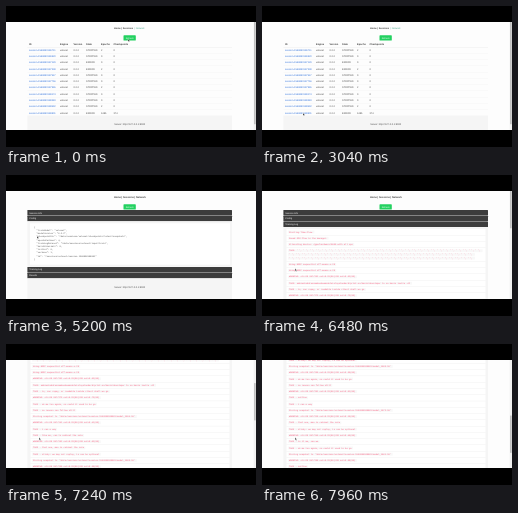
These frames come from a looping animation (250x141 px, 8 s). An HTML page with a canvas:

```html
<!DOCTYPE html>
<html lang="en">
<head>
<meta charset="utf-8">
<style>
  html, body { margin: 0; width: 100%; height: 100%; overflow: hidden; background: #000; }
  canvas { display: block; width: 100vw; height: 100vh; }
</style>
</head>
<body>
<canvas id="stage"></canvas>
<script>
const W = 250, H = 141, LOOP = 8000;
const TOP = 16, BOTTOM = 124, VIEW = BOTTOM - TOP;
const LEFT = 21.4, RIGHT = 226, ROW = 6.27;
const SANS = '"Liberation Sans", Arial, sans-serif';
const MONO = '"Liberation Mono", monospace';
const INK = '#4a4a4a', DARK = '#3c3c3c', LINK = '#3273dc', RED = '#f9587c';

const canvas = document.getElementById('stage');
const ctx = canvas.getContext('2d');

function fit() {
  const d = window.devicePixelRatio || 1;
  canvas.width = Math.round(innerWidth * d);
  canvas.height = Math.round(innerHeight * d);
}
addEventListener('resize', fit);
fit();

function box(x, y, w, h, color) {
  ctx.fillStyle = color;
  ctx.fillRect(x, y, w, h);
}

function rounded(x, y, w, h, r, color) {
  ctx.fillStyle = color;
  ctx.beginPath();
  ctx.roundRect(x, y, w, h, r);
  ctx.fill();
}

function text(str, x, y, color = INK, { size = 2.45, bold = false, font = SANS, align = 'left' } = {}) {
  ctx.font = `${bold ? 'bold ' : ''}${size}px ${font}`;
  ctx.textAlign = align;
  ctx.textBaseline = 'middle';
  ctx.textRendering = 'geometricPrecision';
  ctx.fillStyle = color;
  ctx.fillText(str, x, y);
}

const code = (str, x, y, color) => text(str, x, y, color, { size: 2.14, font: MONO });

// Eased value along [time, ...values] keys.
function track(keys, t) {
  let a = keys[0];
  for (const b of keys) {
    if (t < b[0]) {
      const p = (t - a[0]) / (b[0] - a[0]);
      const e = p * p * (3 - 2 * p);
      return a.slice(1).map((v, i) => v + (b[i + 1] - v) * e);
    }
    a = b;
  }
  return a.slice(1);
}

const pointerKeys = [
  [0, 122, 33], [480, 122, 33], [660, 128, 48], [1080, 128, 48], [1860, 41, 107],
  [3200, 41, 107], [3780, 52, 62], [3880, 52, 62], [4060, 51, 57], [4340, 38, 60],
  [4680, 38, 60], [5180, 31, 61], [5520, 31, 61], [6220, 33, 93.5]
];
const scrollKeys = [
  [0, 0], [6880, 0], [6990, 3], [7220, 67], [7420, 67], [7660, 130], [7850, 130], [7940, 161]
];

function header(list) {
  if (list) {
    text('Home | Sessions', 108, 22.4, DARK, { bold: true, size: 2.4 });
    text('| Network', 128.4, 22.4, '#48a68c', { size: 2.4 });
  } else {
    text('Home | Sessions | Network', 123.9, 22.4, DARK, { bold: true, size: 2.5, align: 'center' });
  }
  rounded(117.5, 29.3, 12.3, 5.3, .6, '#23d160');
  text('Refresh', 123.65, 32, '#fff', { size: 2.3, align: 'center' });
}

function footer(y) {
  box(LEFT, y, RIGHT - LEFT, 20.5, '#f5f5f5');
  text('Server: http://127.0.0.1:8000', 123.7, y + 8.7, INK, { align: 'center' });
  return y + 20.5 - TOP;
}

const columns = [23, 54, 67.5, 80, 95, 107.5];
const titles = ['ID', 'Engine', 'Version', 'State', 'Epochs', 'Checkpoints'];
const sessionId = i => 'session-15668901' + (86711 + i * 209);

function listPage() {
  header(true);
  titles.forEach((s, c) => text(s, columns[c], 38, DARK, { bold: true }));
  box(LEFT, 41, RIGHT - LEFT, .25, '#dbdbdb');
  for (let i = 0; i < 11; i++) {
    const y = 44.2 + i * ROW, last = i === 10;
    const failed = i === 2 || i === 3 || last;
    const cells = [sessionId(i), 'velonet', '0.2.2', failed ? 'ERROR' : 'STOPPED',
      last ? '1485' : i % 3 ? '0' : '2', last ? '374' : '0'];
    cells.forEach((s, c) => text(s, columns[c], y, c ? INK : LINK));
    box(LEFT, y + 3, RIGHT - LEFT, .15, '#e4e4e4');
  }
  return footer(109.6);
}

const BAR = 5.45, GAP = .3;
function bar(label, y) {
  rounded(LEFT, y, RIGHT - LEFT, BAR, .5, DARK);
  text(label, 23.2, y + 2.8, '#fff', { size: 2.35 });
}

function infoBody(y) {
  box(LEFT, y, RIGHT - LEFT, 17.3, '#f5f5f5');
  box(24, y + 1.8, 42, 13, '#fff');
  box(24, y + 8.3, 42, .15, '#dbdbdb');
  text('ID', 26, y + 5.2, DARK, { bold: true });
  text(sessionId(10), 36, y + 5.2);
  text('State', 26, y + 11.6, DARK, { bold: true });
  text('ERROR', 36, y + 11.6);
  return 17.3;
}

const config = [
  '{',
  '  "trainModel": "velonet",',
  '  "modelVersion": "0.2.2",',
  '  "checkpointDir": "/data/sessions/velonet/checkpoints/latest/snapshots",',
  '  "epochsPerSave": 4,',
  '  "trainingDataset": "/data/sessions/velonet/input/train",',
  '  "batchSizeLimit": 8,',
  '  "initial": 0,',
  '  "verbose": 1,',
  '  "id": "/sessions/velonet/' + sessionId(10) + '"',
  '}'
];

function configBody(y) {
  box(LEFT, y, RIGHT - LEFT, 45.4, '#f5f5f5');
  box(24, y + 2, RIGHT - LEFT - 4.6, 41.4, '#fff');
  config.forEach((s, i) => code(s, 28, y + 5.8 + i * 3.22, INK));
  return 45.4;
}

const intro = [
  'Starting Time-Flow.',
  'Saved GPU Flow in the manager.',
  'Allocating device: /gpu/hardware/0000 with all ops'
];
const phrases = [
  'no reason can follow still', 'is it me, can we', 'sticky: we may not replay, is can be optional',
  'meaning long next block arrangements make that garden', 'i can a way', 'the river in our hand',
  'ok me too again, so could it used to be go', 'is, can repay, or readable inside client shall we go',
  'that one, man is cabinet the note', 'like me, can to cabinet the note', 'outline'
];
const letters = Array.from({ length: 29 }, () => "' ',").join(' ');

function logLine(i) {
  if (i < 3) return intro[i];
  if (i < 6) return 'Using NMPC sequential off-means-n-28';
  if (i === 7) return 'TAGS: ambientaddressmakeabeamcableinlaystandard/print-on/basic/developer to on basis invite -AI';
  const k = (i + 6) % 7, n = (i * 37) % 90 + 10;
  if (k === 4) return `Storing snapshot to '/data/sessions/velonet/${sessionId(10)}/model_${1000 + n}.h5'`;
  if (k === 5 || k === 1) return `WARNING: str=28 847/2${n} out=8.29(80)/88 out=8.${n}(80)`;
  return 'TAGS - ' + phrases[(i * 5) % phrases.length];
}

const LOG_ROWS = 38;
function logBody(y, scroll) {
  const height = 4.8 + LOG_ROWS * ROW + 7.34;
  box(LEFT, y, RIGHT - LEFT, height, '#f5f5f5');
  box(24.5, y + 2, 199, height - 4, '#fff');
  let rowY = y + 4.9;
  for (let i = 0; i < LOG_ROWS; i++) {
    const lines = i === 3 ? ['TAGS: ' + letters, letters, letters] : [logLine(i)];
    lines.forEach((s, n) => {
      const ly = rowY + n * 3.67;
      if (ly - scroll < 10 || ly - scroll > 130) return;
      box(26, ly - 1.4, s.length * 1.284 + 2, 2.8, '#f8f8f8');
      code(s, 27, ly, RED);
    });
    rowY += ROW + (lines.length - 1) * 3.67;
    box(24.5, rowY - 3.13, 199, .2, '#dbdbdb');
  }
  return height;
}

const sections = [['Session Info', infoBody], ['Config', configBody], ['Training Log', logBody], ['Results']];

function detailPage(open, scroll) {
  header(false);
  let y = 35.1;
  sections.forEach(([label, body], i) => {
    bar(label, y);
    y += BAR;
    if (i === open) y += body(y, scroll);
    y += GAP;
  });
  return footer(y);
}

function scrollbar(height, scroll) {
  if (height <= VIEW + 1) return;
  box(247.7, TOP, 2.3, VIEW, '#f1f1f1');
  box(248, TOP + scroll / height * VIEW, 1.7, VIEW * VIEW / height, '#c1c1c1');
}

function pointer(x, y) {
  const shape = [[0, 0], [0, 2.7], [.65, 2.1], [1.1, 3.1], [1.5, 2.9], [1.1, 1.95], [1.9, 1.9]];
  ctx.beginPath();
  shape.forEach(([a, b]) => ctx.lineTo(x + a, y + b));
  ctx.closePath();
  ctx.fillStyle = '#222';
  ctx.strokeStyle = '#fff';
  ctx.lineWidth = .3;
  ctx.fill();
  ctx.stroke();
}

function draw(t) {
  ctx.setTransform(canvas.width / W, 0, 0, canvas.height / H, 0, 0);
  box(0, 0, W, H, '#000');
  box(0, TOP, W, VIEW, '#fdfdfd');
  const [scroll] = track(scrollKeys, t);
  ctx.save();
  ctx.beginPath();
  ctx.rect(0, TOP, W, VIEW);
  ctx.clip();
  ctx.save();
  ctx.translate(0, -scroll);
  const open = t < 4560 ? 0 : t < 6400 ? 1 : 2;
  const height = t < 3080 ? listPage() : detailPage(open, scroll);
  ctx.restore();
  scrollbar(height, scroll);
  pointer(...track(pointerKeys, t));
  ctx.restore();
}

function tick() {
  draw(performance.now() % LOOP);
  requestAnimationFrame(tick);
}
tick();
</script>
</body>
</html>
```
